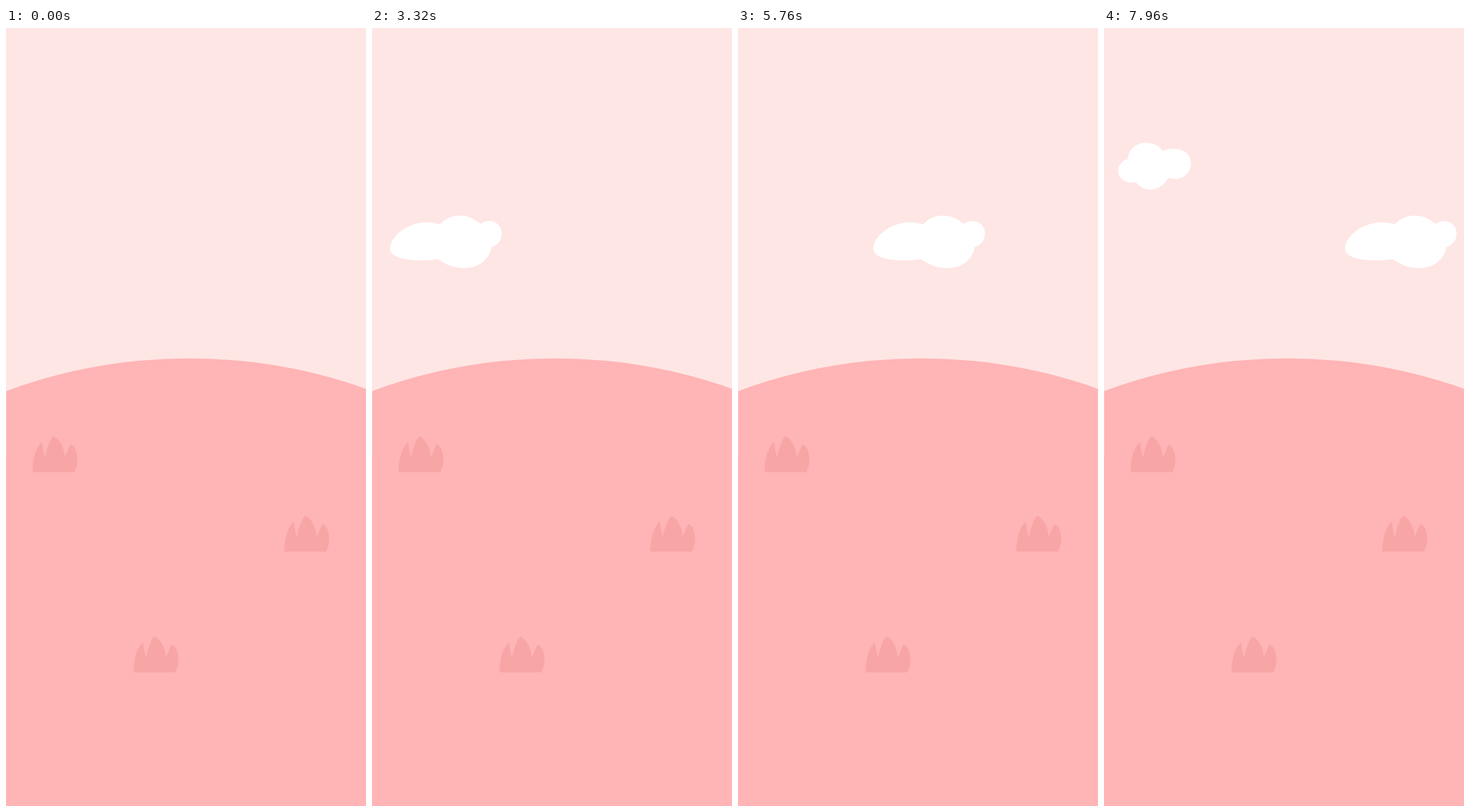
Write an HTML page with a canvas that moves like this. It is 509 by 1101 pixels and loops after 8 s.

```html
<!DOCTYPE html>
<html lang="en">
<head>
<meta charset="utf-8">
<title>Drifting clouds</title>
<style>
html, body { margin: 0; width: 100%; height: 100%; overflow: hidden; background: #fee6e4; }
canvas { display: block; }
</style>
</head>
<body>
<canvas id="stage" width="509" height="1101"></canvas>
<script>
const W = 509, H = 1101, LOOP = 8000, STEP = 40, SPEED = 0.0679;
const SKY = '#fee6e4', HILL = '#ffb4b5', GRASS = '#f8a5a6', CLOUD = '#fff';
const ctx = document.getElementById('stage').getContext('2d');

const tuft = new Path2D(`M37.5 628.5 C37.5 610 42 594 51 586 C52 593 52.5 601 55.5 607
  C57.5 596 62 583 66 578.7 Q67.2 577.6 68.6 578.6 C76.5 583 82.5 595 83 607
  C86.5 602 88 595 91 589.5 C98 591 101 602 101 611 C101 618 99 624 96.5 628.5Z`);

// Each cloud is drawn where it stands at time `at`.
const clouds = [
  { at: 3320, shape: new Path2D(`M25.5 312 C26 295 50 275 77 275 C84 275 90 276 96 278
    C103 270 113 265.5 124 265.5 C136 265.5 145 270 153 277 C157 274.5 161.5 273.2 166.5 273.2
    C176.5 273.2 183.5 281 183.5 290.5 C183.5 300 178 307.5 169 310 C166 328 151 339.8 130 339.8
    C116 339.8 104 335 93 327 C86 328.3 78 328.8 69 328.8 C40 328.8 25.5 322 25.5 312Z`) },
  { at: 7960, shape: new Path2D(`M20 202 C20 194 25 188 33.5 185.5 C35 172 45 162.3 59 162.3
    C69 162.3 78 166 83 174 C88 172 93 170.8 99 170.8 C112 170.8 123 179 123 191
    C123 204 113 213.5 100 213.5 C97 213.5 94 213 91 212 C86 222 76 228.7 65 228.7
    C57 228.7 50 225 45 218.3 C43 218.8 41 219 39 219 C28 219 20 211 20 202Z`) }
];

function fillAt(shape, color, x, y) {
  ctx.save();
  ctx.translate(x, y);
  ctx.fillStyle = color;
  ctx.fill(shape);
  ctx.restore();
}

function drawHill() {
  const radius = 746;
  ctx.fillStyle = HILL;
  ctx.beginPath();
  ctx.arc(259, 467.5 + radius, radius, 0, Math.PI * 2);
  ctx.fill();
  ctx.fillStyle = SKY;
  ctx.fillRect(0, 514, 0.3, 92);
}

function draw(time) {
  ctx.fillStyle = SKY;
  ctx.fillRect(0, 0, W, H);
  for (const { at, shape } of clouds) fillAt(shape, CLOUD, (time - at) * SPEED, 0);
  drawHill();
  for (const [x, y] of [[0, 0], [356, 112.5], [142.8, 283.3]]) fillAt(tuft, GRASS, x, y);
}

function tick() {
  const time = performance.now() % LOOP;
  draw(Math.floor(time / STEP) * STEP);
  requestAnimationFrame(tick);
}
tick();
</script>
</body>
</html>
```
